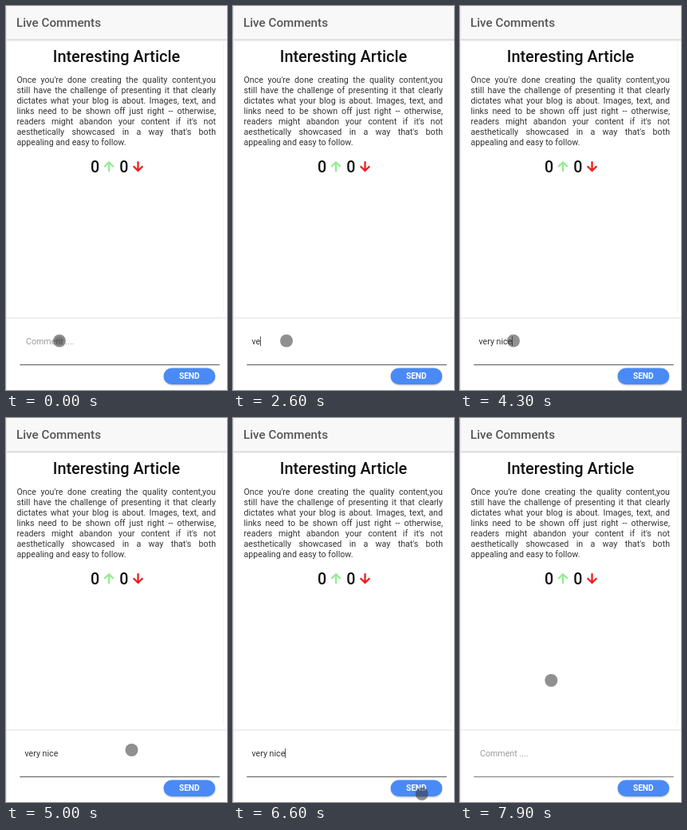
Recreate the animation shown at these times as an HTML page. Size 277x480 px, loop 8 s.

```html
<!DOCTYPE html>
<html lang="en">
<head>
<meta charset="utf-8">
<title>Live Comments</title>
<style>
  html, body { margin: 0; width: 100%; height: 100%; overflow: hidden; background: #fff; }
  body { position: relative; font-family: Roboto, Arial, sans-serif; }
  svg { position: absolute; left: 0; top: 0; }
  .article, .field {
    position: absolute;
    font-size: 10.65px;
    line-height: 13px;
    color: #333;
    white-space: nowrap;
  }
  .article { left: 13.5px; top: 86px; width: 249.5px; }
  .article div { text-align: justify; text-align-last: justify; white-space: normal; }
  .article div:last-child { text-align-last: left; }
  .field { left: 23.5px; top: 412.5px; }
  #hint { left: 25px; color: #9a9a9a; }
  #caret {
    display: inline-block;
    width: 1px;
    height: 12px;
    margin-left: -.4px;
    background: #555;
    vertical-align: -2.5px;
  }
  #touch {
    position: absolute;
    left: -8px;
    top: -8px;
    width: 16px;
    height: 16px;
    border-radius: 50%;
    background: rgba(50, 50, 50, .54);
  }
  #touch.down { background: radial-gradient(rgba(50, 50, 50, .66) 35%, rgba(50, 50, 50, .5) 70%); }
</style>
</head>
<body>
<svg width="277" height="480" viewBox="0 0 277 480">
  <defs>
    <linearGradient id="fade" x2="0" y2="1">
      <stop offset="0" stop-color="#cecece"/>
      <stop offset="1" stop-color="#fff"/>
    </linearGradient>
    <filter id="soft" x="-20%" y="-30%" width="140%" height="180%">
      <feGaussianBlur stdDeviation="1.2"/>
    </filter>
  </defs>
  <rect width="277" height="42" fill="#f8f8f8"/>
  <rect y="41.5" width="277" height="3" fill="url(#fade)"/>
  <rect width="1" height="480" fill="#e6e6e6"/>
  <rect x="272" y="45" width="1" height="339" fill="#f4f4f4"/>
  <text x="13" y="26" font-size="15.2" font-weight="500" fill="#555">Live Comments</text>
  <text x="138.5" y="70" font-size="19.9" font-weight="500" fill="#111" text-anchor="middle">Interesting Article</text>
  <g font-size="19.6" font-weight="500" fill="#111">
    <text x="106" y="207.7">0</text>
    <text x="142.3" y="207.7">0</text>
  </g>
  <g fill="none" stroke-width="2.3">
    <path d="M129 207V195.3M123.2 201L129 195.3L134.8 201" stroke="#90ee90"/>
    <path d="M165.5 194.3V206M159.7 200.3L165.5 206L171.3 200.3" stroke="#ee1c1c"/>
  </g>
  <rect y="389.5" width="277" height="1" fill="#dfdfdf"/>
  <rect id="rule" x="17.3" y="447.9" width="250.5" height="1.2"/>
  <rect x="198" y="454" width="64" height="20" rx="10" fill="#000" opacity=".28" filter="url(#soft)"/>
  <rect x="197.5" y="452.5" width="64.8" height="20.5" rx="10.25" fill="#4a8af6"/>
  <text x="229.8" y="466.2" font-size="10.2" font-weight="700" fill="#fff" text-anchor="middle">SEND</text>
</svg>

<div class="article">
  <div>Once you're done creating the quality content,you</div>
  <div>still have the challenge of presenting it that clearly</div>
  <div>dictates what your blog is about. Images, text, and</div>
  <div>links need to be shown off just right -- otherwise,</div>
  <div>readers might abandon your content if it's not</div>
  <div>aesthetically showcased in a way that's both</div>
  <div>appealing and easy to follow.</div>
</div>

<div class="field" id="hint">Comment ....</div>
<div class="field"><span id="typed" style="white-space:pre"></span><i id="caret"></i></div>
<div id="touch"></div>

<script>
  const LOOP = 8000, TICK = 100, CLEAR = 7900;
  const comment = 'very nice';
  const keyTimes = [2300, 2600, 2700, 2900, 3100, 3600, 4000, 4300, 4300];
  const focusTime = 1100, blurTime = 7000;
  const presses = [[0, 1100], [5700, 6500]];

  // time, x, y
  const path = [
    [4700, 67, 418.5], [4800, 78, 411], [4900, 113, 401], [5000, 157.5, 415],
    [5100, 197, 436], [5200, 218, 452], [5400, 234, 467], [5600, 236.7, 470],
    [6700, 236.7, 470], [6900, 220, 457], [7000, 191.7, 433], [7100, 139, 364],
    [7200, 139, 364], [7300, 116, 330], [7400, 114.3, 328]
  ];

  const el = id => document.getElementById(id);
  const [hint, typed, caret, touch, rule] = ['hint', 'typed', 'caret', 'touch', 'rule'].map(el);
  const within = (t, [from, to]) => t >= from && t < to;

  function touchAt(t) {
    const i = path.findIndex(p => p[0] > t);
    if (i === 0) return path[0].slice(1);
    if (i < 0) return path[path.length - 1].slice(1);
    const [t0, x0, y0] = path[i - 1], [t1, x1, y1] = path[i];
    const k = (t - t0) / (t1 - t0);
    return [x0 + (x1 - x0) * k, y0 + (y1 - y0) * k];
  }

  function caretOn(t) {
    if (t < focusTime || t >= blurTime) return false;
    if (t >= 5800) return t >= 6500;
    // each key restarts the blink
    const since = Math.max(focusTime, ...keyTimes.filter(k => k <= t));
    return Math.floor((t - since) / 500) % 2 === 0;
  }

  function draw(now) {
    const t = Math.floor((now % LOOP) / TICK) * TICK;
    const count = t >= CLEAR ? 0 : keyTimes.filter(k => k <= t).length;
    const [x, y] = touchAt(t);
    typed.textContent = comment.slice(0, count);
    hint.style.visibility = count ? 'hidden' : 'visible';
    caret.style.visibility = caretOn(t) ? 'visible' : 'hidden';
    rule.setAttribute('fill', t >= 7300 ? '#858585' : '#6a6a6a');
    touch.className = presses.some(p => within(t, p)) ? 'down' : '';
    touch.style.transform = `translate(${x}px, ${y}px)`;
  }

  const start = performance.now();
  function frame() {
    draw(performance.now() - start);
    requestAnimationFrame(frame);
  }
  frame();
</script>
</body>
</html>
```
